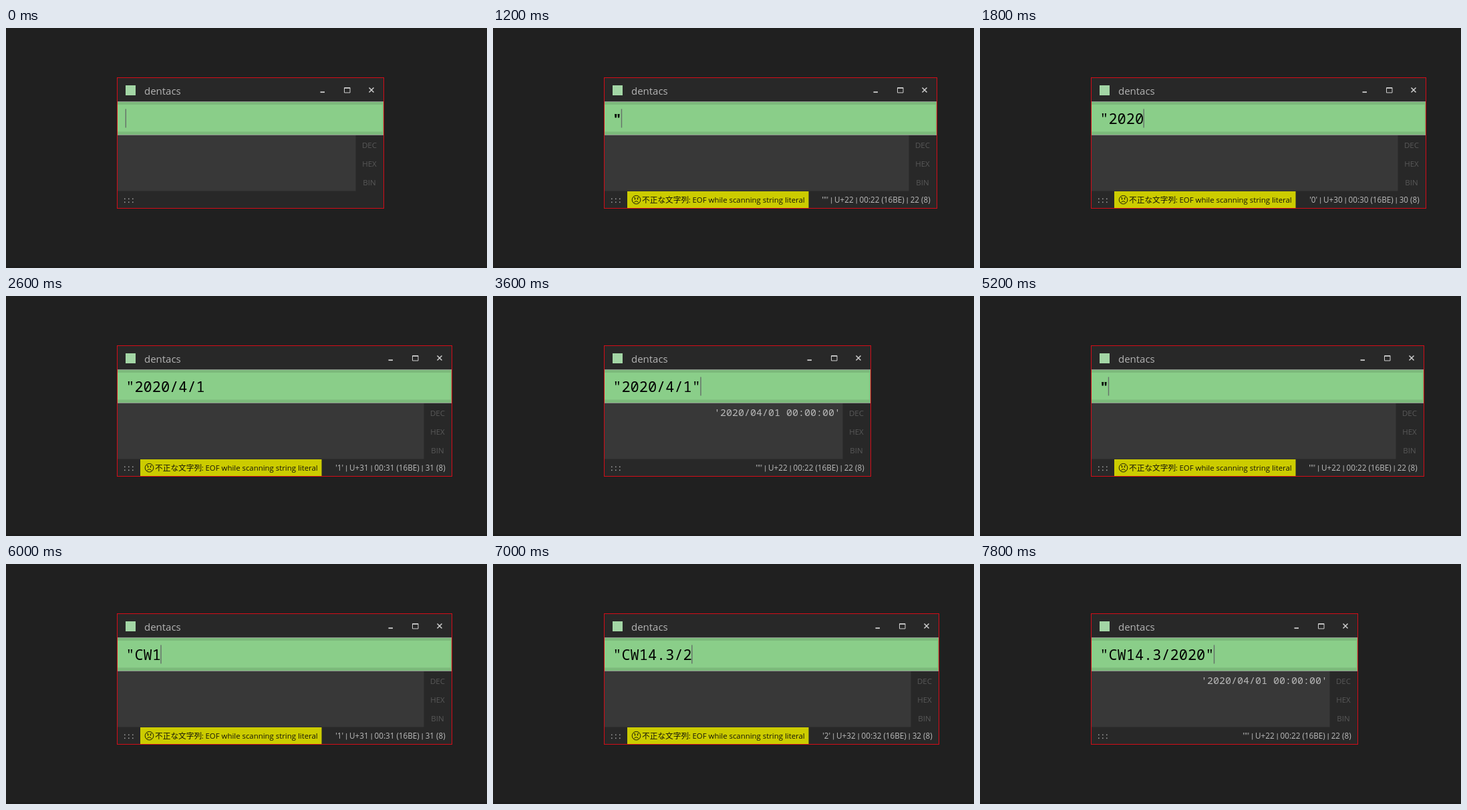
Write an HTML page that moves like this. It is 720x360 px and loops after 8000 ms.

```html
<!DOCTYPE html>
<html lang="ja">
<head>
<meta charset="utf-8">
<title>dentacs</title>
<style>
  html, body { margin: 0; width: 100%; height: 100%; overflow: hidden; background: #202020; }
  svg { display: block; width: 720px; height: 360px; }
  text { font-family: "Open Sans", "Noto Sans", sans-serif; white-space: pre; }
  .mono { font-family: "Noto Sans Mono", "DejaVu Sans Mono", monospace; }
  .cjk { font-family: "Noto Sans CJK JP", "Noto Sans CJK", sans-serif; }
  .bar { font-family: Roboto, sans-serif; }
  .base { font-size: 11.5px; fill: #585858; text-anchor: middle; }
</style>
</head>
<body>
<svg viewBox="0 0 720 360">
  <rect width="720" height="360" fill="#202020"/>
  <rect y="357" width="720" height="3" fill="#1d1d1d"/>

  <rect class="grow" x="167" y="75" height="195" fill="#282828"/>
  <rect x="179" y="86" width="15" height="15" fill="#a3d6a5"/>
  <text x="207" y="99.5" font-size="15" fill="#b4b4b4">dentacs</text>

  <rect class="grow" x="167" y="110" height="51" fill="#8b938b"/>
  <rect class="grow" x="167" y="111" height="49" fill="#7cba7b"/>
  <rect id="lcd" x="167" y="115" height="40.5" fill="#8ace89"/>
  <text id="input" class="mono" x="179.3" y="143.6" font-size="21.95"></text>
  <rect id="caret" y="121.5" width="1.4" height="28" fill="#66706a"/>

  <rect id="panel" x="167" y="161" height="83.5" fill="#383838"/>
  <text id="result" class="mono" y="180" font-size="15" text-anchor="end"></text>

  <g fill="#a0a0a0" id="grip"></g>
  <g id="error">
    <rect x="201" y="245" width="271.5" height="25" fill="#cccc00"/>
    <g fill="none" stroke="#1c1c08">
      <circle cx="214.5" cy="257.7" r="6.3"/>
      <path d="M211.3 261.6q3.2-3.6 6.4 0M211 254.2l2.4 1.2M218 254.2l-2.4 1.2"/>
      <path d="M212.5 255.6v1.8M216.5 255.6v1.8" stroke-width="1.3"/>
    </g>
    <g fill="#15150a">
      <text class="cjk" x="223" y="262" font-size="11.7">不正な文字列</text>
      <text x="292.8" y="262" font-size="11.4">:</text>
      <text x="298.5" y="262" font-size="11.4">EOF while scanning string literal</text>
    </g>
  </g>

  <g id="right">
    <g fill="none" stroke="#cfcfcf">
      <path d="M-95 96.2h6.5" stroke-width="1.8"/>
      <path d="M-59 89.5h8.5v7.5h-8.5zM-59 90.3h8.5"/>
      <path d="M-22 89.5l7 7m0-7l-7 7" stroke-width="1.5"/>
    </g>
    <text class="base" x="-21.5" y="179.7">DEC</text>
    <text class="base" x="-21.5" y="207.7">HEX</text>
    <text class="base" x="-21.5" y="235.7">BIN</text>
    <text id="status" x="-9.8" y="262" font-size="11.7" fill="#bcbcbc" text-anchor="end"></text>
  </g>
  <rect id="frame" x="166.5" y="74.5" height="196" fill="none" stroke="#d40c18"/>
</svg>
<script>
const $ = id => document.getElementById(id);
const LOOP = 8000, STEP = 200, CELL = 13.17, NARROW = 565.5;
const RESULT = "'2020/04/01 00:00:00'";
const EDGE = { '"': 664.5, '/': 666.5, '.': 663.5, C: 668.5, W: 671.5 };

// Typing schedule: [time, content of the input]
const keys = [
  [0, ''], [1200, '"'], [1400, '"2'], [1600, '"20'], [1800, '"2020'],
  [2000, '"2020/'], [2200, '"2020/4'], [2400, '"2020/4/1'], [2800, '"2020/4/1"'],
  [4400, '"2020/4/1'], [4600, '"202'], [4800, ''], [5200, '"']
];
const week = '"CW14.3/2020"';
for (let n = 2; n <= week.length; n++) keys.push([5600 + (n - 2) * STEP, week.slice(0, n)]);

const closed = s => s.length > 1 && s.endsWith('"');

function hasResult(i) {
  while (i >= 0 && keys[i][1]) if (closed(keys[i--][1])) return true;
  return false;
}

function charInfo(ch) {
  if (!ch) return '';
  const hex = ch.charCodeAt(0).toString(16).toUpperCase();
  return [`'${ch}'`, `U+${hex}`, `00:${hex} (16BE)`, `${hex} (8)`]
    .join(' <tspan class="bar">|</tspan> ');
}

for (const x of [177, 183, 189]) {
  for (const y of [255.5, 260.5]) {
    $('grip').insertAdjacentHTML('beforeend', `<rect x="${x}" y="${y}" width="1.5" height="1.6"/>`);
  }
}

let shown = -1;

function showText(i) {
  const s = keys[i][1], ch = s.slice(-1);
  const error = s !== '' && !closed(s);
  const right = error ? EDGE[ch] || 667.5 : NARROW;

  for (const r of document.querySelectorAll('.grow')) r.setAttribute('width', right - 167);
  $('lcd').setAttribute('width', right - 169);
  $('panel').setAttribute('width', right - 209);
  $('frame').setAttribute('width', right - 166.5);
  $('right').setAttribute('transform', `translate(${right})`);

  $('input').textContent = s;
  $('input').setAttribute('font-weight', s === '"' ? 700 : 400);
  $('caret').setAttribute('x', 178.6 + s.length * CELL);
  $('result').textContent = hasResult(i) ? RESULT : '';
  $('result').setAttribute('x', right - 45.5);
  $('result').setAttribute('fill', error ? '#686868' : '#b8b8b8');
  $('error').style.display = error ? '' : 'none';
  $('status').innerHTML = charInfo(ch);
}

function draw(now) {
  const t = now % LOOP;
  let i = keys.length - 1;
  while (keys[i][0] > t) i--;
  if (i !== shown) showText(shown = i);
  const on = Math.floor((t - keys[i][0]) / STEP) % 2 === 0;
  $('caret').style.display = on ? '' : 'none';
}

const start = performance.now();
function tick() {
  draw(performance.now() - start);
  requestAnimationFrame(tick);
}
tick();
</script>
</body>
</html>
```
